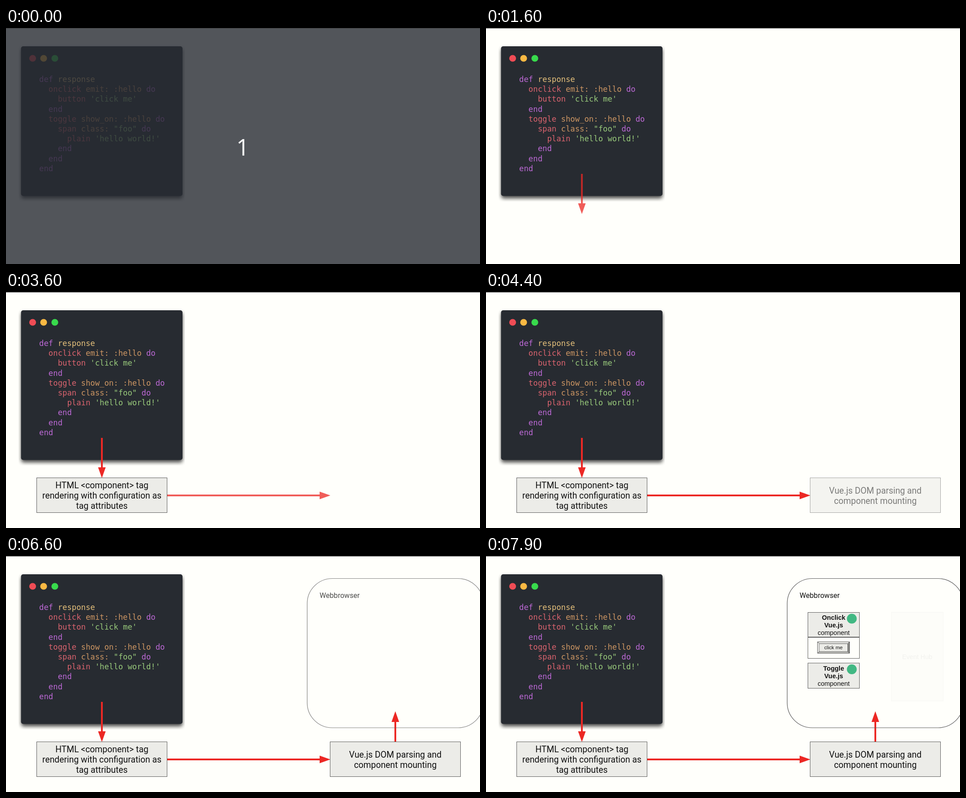
Write an HTML page that moves like this. It is 1058 px wide and 529 px high and loops after 8 s.

```html
<!DOCTYPE html>
<html lang="en">
<head>
<meta charset="utf-8">
<title>Component rendering flow</title>
<style>
html, body { margin: 0; width: 100%; height: 100%; overflow: hidden; background: #fffffb; }
svg { display: block; width: 1058px; height: 529px; }
text { font-family: Roboto, sans-serif; font-size: 19.35px; fill: #111; white-space: pre; }
.mid text { text-anchor: middle; }
.code text { font-family: "DejaVu Sans Mono", monospace; font-size: 17.25px; }
.small text { font-family: "Liberation Sans", Arial, sans-serif; font-size: 14.5px; }
.small .bold { font-weight: bold; }
.small .label { font-size: 11.4px; }
.box { fill: #ecece8; stroke: #5c5c5c; }
.plain { fill: #fffffb; stroke: #5c5c5c; }
.line { stroke: #ec2824; stroke-width: 4; }
.head { fill: #ec2824; }
.k { fill: #bd69d6; }
.r { fill: #d9636e; }
.y { fill: #e5c07b; }
.o { fill: #cd9663; }
.g { fill: #98c97b; }
</style>
</head>
<body>
<svg viewBox="0 0 1058 529">
  <defs>
    <filter id="blur" x="-10%" y="-10%" width="120%" height="120%"><feGaussianBlur stdDeviation="4"/></filter>
    <clipPath id="cut"><rect x="28" y="36" width="371" height="353"/></clipPath>
  </defs>
  <rect width="1058" height="529" fill="#fffffb"/>

  <g clip-path="url(#cut)">
    <rect x="34" y="46" width="360" height="336" rx="5" fill="#000" opacity=".7" filter="url(#blur)"/>
  </g>
  <rect x="33.5" y="41" width="360.5" height="335.5" rx="5" fill="#272b31"/>
  <circle cx="59.5" cy="68" r="7.6" fill="#f04c55"/>
  <circle cx="84" cy="68" r="7.6" fill="#fab943"/>
  <circle cx="109" cy="68" r="7.6" fill="#38da4c"/>
  <g class="code" id="code"></g>

  <!-- fading steps, in order of appearance -->
  <g class="step">
    <path class="line" d="M214 327V394"/>
    <path class="head" d="M205.5 393h17L214 417z"/>
  </g>
  <g class="step mid">
    <rect class="box" x="68.5" y="416.5" width="291" height="78"/>
    <text x="214" y="440.3">HTML &lt;component&gt; tag</text>
    <text x="214" y="463.2">rendering with configuration as</text>
    <text x="214" y="486.1">tag attributes</text>
  </g>
  <g class="step">
    <path class="line" d="M360 456H701"/>
    <path class="head" d="M700 447.5v17L724 456z"/>
  </g>
  <g class="step mid">
    <rect class="box" x="723.5" y="416.5" width="291" height="78"/>
    <text x="869" y="451.7">Vue.js DOM parsing and</text>
    <text x="869" y="474.6">component mounting</text>
  </g>
  <g class="step">
    <path class="line" d="M869 416V371"/>
    <path class="head" d="M860.5 372h17L869 348z"/>
  </g>
  <g class="step">
    <rect x="672.3" y="50.5" width="393" height="334.5" rx="56" fill="none" stroke="#5c5c5c" stroke-width="1.2"/>
    <text x="700" y="94" style="font-size:16.1px">Webbrowser</text>
  </g>
  <g class="step mid small">
    <rect class="box" x="718.5" y="126.5" width="115" height="55"/>
    <rect class="plain" x="718.5" y="182.5" width="115" height="47"/>
    <text class="bold" x="776" y="143">Onclick</text>
    <text class="bold" x="776" y="160">Vue.js</text>
    <text x="776" y="177">component</text>
    <circle cx="816.5" cy="140.5" r="11" fill="#41b883"/>

    <rect x="740" y="192.5" width="71.5" height="25.5" fill="#f0f0ed"/>
    <path d="M740 218l4-4h63.5l4 4z" fill="#bdbdba"/>
    <path d="M811.5 192.5v25.5l-4-4v-17.5z" fill="#8e8e8b"/>
    <path d="M740 192.5h71.5v25.5H740zM744 196.5h63.5V214H744zM740 192.5l4 4M811.5 192.5l-4 4M740 218l4-4M811.5 218l-4-4" fill="none" stroke="#505050"/>
    <rect x="744.5" y="197" width="62.5" height="16.5" fill="#ecece8"/>
    <text class="label" x="775.5" y="209">click me</text>

    <rect class="box" x="718.5" y="240" width="115" height="56.5"/>
    <text class="bold" x="776" y="257">Toggle</text>
    <text class="bold" x="776" y="274">Vue.js</text>
    <text x="776" y="291">component</text>
    <circle cx="816.5" cy="254" r="11" fill="#41b883"/>
  </g>
  <g class="step mid small">
    <rect class="box" x="905" y="126" width="115.5" height="199"/>
    <text x="962.5" y="231">Event Hub</text>
  </g>

  <g id="intro" class="mid">
    <rect y="1" width="1058" height="528" fill="#272b32" opacity=".8"/>
    <text x="528.5" y="285.5" style="font:51px 'Open Sans',sans-serif;fill:#fff">1</text>
  </g>
  <rect width="1058" height="1" fill="#3a3a3a"/>
</svg>
<script>
// each line: indent, then alternating colour class and text
const lines = [
  [0, "k", "def ", "y", "response"],
  [2, "r", "onclick ", "o", "emit: :hello ", "k", "do"],
  [4, "r", "button ", "g", "'click me'"],
  [2, "k", "end"],
  [2, "r", "toggle ", "o", "show_on: :hello ", "k", "do"],
  [4, "r", "span ", "o", "class: ", "g", '"foo" ', "k", "do"],
  [6, "r", "plain ", "g", "'hello world!'"],
  [4, "k", "end"],
  [2, "k", "end"],
  [0, "k", "end"]
];
document.getElementById("code").innerHTML = lines.map(([indent, ...parts], row) => {
  let spans = "";
  for (let i = 0; i < parts.length; i += 2) spans += `<tspan class="${parts[i]}">${parts[i + 1]}</tspan>`;
  return `<text x="${74.1 + indent * 10.385}" y="${121 + row * 22.2}">${spans}</text>`;
}).join("");

const LOOP = 8000, TICK = 100, FIRST = 850, FADE = 1000;
const steps = document.querySelectorAll(".step");
const intro = document.getElementById("intro");

function draw(time) {
  const t = Math.floor(time % LOOP / TICK) * TICK;
  intro.style.display = t < TICK ? "" : "none";
  steps.forEach((step, i) => {
    step.style.opacity = Math.min(1, Math.max(0, (t - FIRST) / FADE - i));
  });
}

const start = performance.now();
function frame() {
  draw(performance.now() - start);
  requestAnimationFrame(frame);
}
frame();
</script>
</body>
</html>
```
